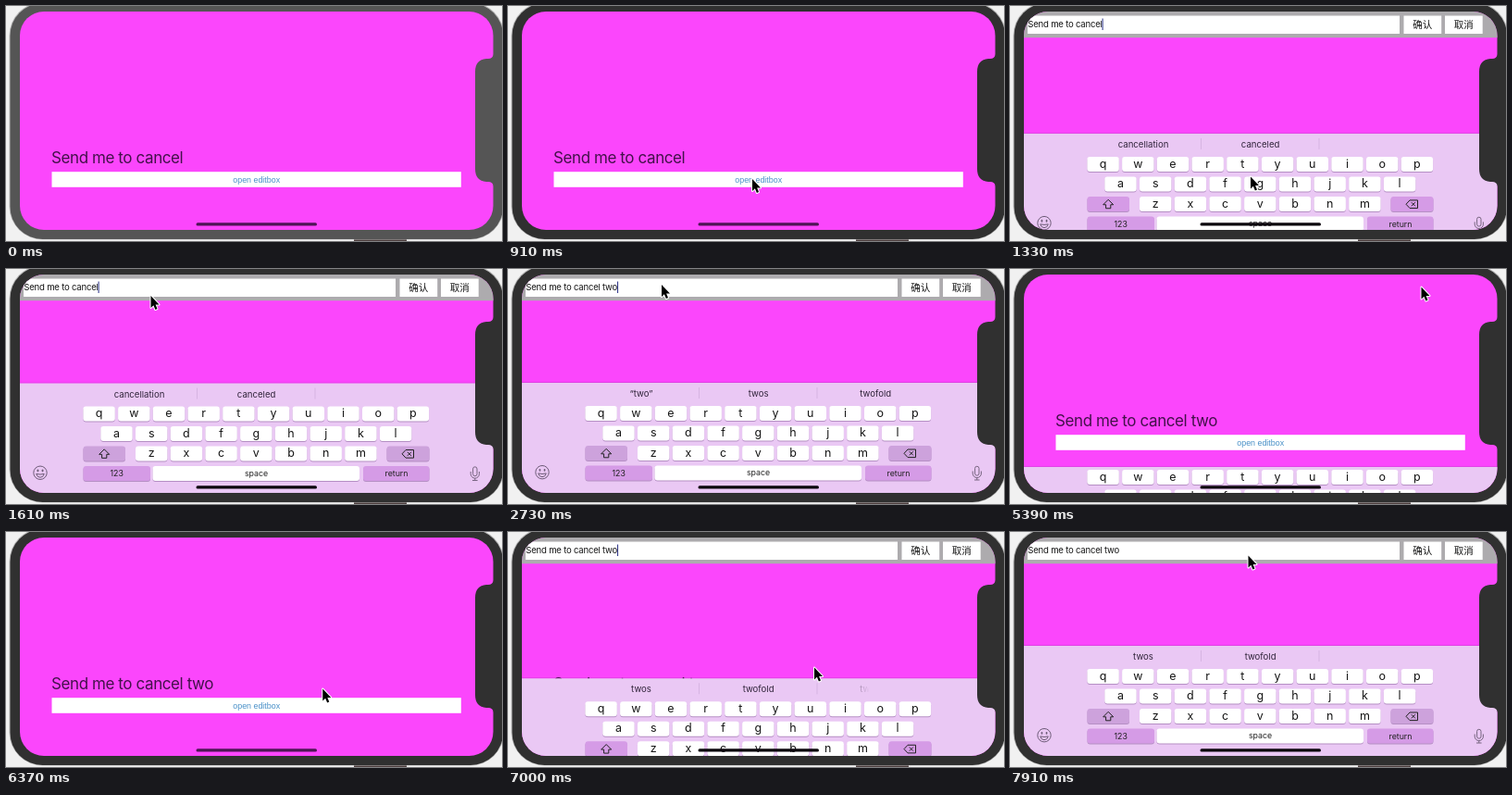
Write an HTML page with a canvas that moves like this. It is 536x254 px and loops after 8 s.

```html
<!DOCTYPE html>
<html lang="en">
<head>
<meta charset="utf-8">
<title>Edit box on a phone</title>
<style>
html, body { margin: 0; width: 100%; height: 100%; overflow: hidden; background: #f1f1f1; }
canvas { display: block; width: 536px; height: 254px; }
</style>
</head>
<body>
<canvas id="stage"></canvas>
<script>
const W = 536, H = 254, LOOP = 8000;
const canvas = document.getElementById('stage');
const dpr = window.devicePixelRatio || 1;
canvas.width = W * dpr;
canvas.height = H * dpr;
const ctx = canvas.getContext('2d');

const UI = 'Inter, "Noto Sans", sans-serif';
const PLAIN = '"Liberation Sans", Arial, sans-serif';
const CJK = '"Noto Sans CJK SC", "Noto Sans CJK", sans-serif';
const TIGHT = -0.024;

const FOCUS = 910;
const OPEN = [1065, 6816];
const CLOSE = 5265;
const KEYS = [2310, 2450, 2590, 2730];

// time, x, y of the pointer tip
const POINTER = [
  [140, -12, 232], [840, 264, 187], [1120, 264, 187], [1330, 260, 184.5],
  [1610, 156.5, 29], [1750, 158, 20], [1890, 166, 17], [3920, 166, 17],
  [4620, 436, 12], [4900, 444.5, 19.5], [5530, 444.5, 19.5], [6020, 352, 150],
  [6160, 352, 150], [6560, 334, 186], [6840, 334, 186], [7000, 331, 146.5],
  [7560, 262, 30], [7800, 257.5, 25.5], [8000, 257.5, 25.5]
];

const HINTS = [
  [1065, ['cancellation', 'canceled', '']],
  [2310, ['', '', '']],
  [2450, ['“t”', 'the', 'to']],
  [2590, ['“tw”', 'two', 'twice']],
  [2730, ['“two”', 'twos', 'twofold']],
  [6816, ['twos', 'twofold', '']]
];

const ROWS = [['qwertyuiop', 100.6, 148], ['asdfghjkl', 119.5, 169.5], ['zxcvbnm', 157.2, 191]];
const PITCH = 37.7, KEY_W = 34.4, KEY_H = 16;

const ease = p => p * p * (3 - 2 * p);
const spring = s => s <= 0 ? 0 : 1 - (1 + 14 * s) * Math.exp(-14 * s);

function round(x, y, w, h, r, fill) {
  ctx.beginPath();
  ctx.roundRect(x, y, w, h, r);
  ctx.fillStyle = fill;
  ctx.fill();
}

function rect(x, y, w, h, fill) {
  ctx.fillStyle = fill;
  ctx.fillRect(x, y, w, h);
}

// Returns the width of the drawn text.
function text(str, x, y, size, family, fill, align = 'center', tracking = 0) {
  ctx.font = `${size}px ${family}`;
  ctx.letterSpacing = `${tracking * size}px`;
  ctx.textAlign = align;
  ctx.fillStyle = fill;
  ctx.fillText(str, x, y);
  return ctx.measureText(str).width;
}

function line(path, width = 1, color = '#222') {
  ctx.lineWidth = width;
  ctx.strokeStyle = color;
  ctx.stroke(new Path2D(path));
}

function at(x, y, draw) {
  ctx.save();
  ctx.translate(x, y);
  draw();
  ctx.restore();
}

function key(x, y, w, fill) {
  round(x, y + 1, w, KEY_H, 3, '#b58fc4');
  round(x, y, w, KEY_H, 3, fill);
}

function typed(t) {
  const count = KEYS.filter(k => t >= k).length;
  return 'Send me to cancel' + ' two'.slice(0, count);
}

function scene(t) {
  rect(15, 6, 512, 237, '#fb46fc');
  const label = t < CLOSE ? 'Send me to cancel' : 'Send me to cancel two';
  text(label, 49, 169.5, 17, UI, '#43124a', 'left', TIGHT);
  rect(49.5, 179.2, 442.3, 16.6, '#fff');
}

function editBar(t) {
  rect(15, 6, 512, 28.2, '#adabae');
  rect(19, 10.5, 402, 19.5, '#fff');
  for (const [x, name] of [[425.5, '确认'], [470, '取消']]) {
    rect(x, 10.5, 40.7, 19.5, '#fff');
    text(name, x + 20.2, 24.2, 10.5, CJK, '#161616');
  }
  const shown = text(typed(t), 19.3, 23.4, 9.6, UI, '#161616', 'left', TIGHT);
  const reset = [...OPEN, 1890, ...KEYS].filter(k => k <= t);
  if ((t - Math.max(...reset)) % 1100 < 600) rect(19.3 + shown, 13.5, 1, 12.5, '#252c84');
}

function hints(t, y) {
  let i = 0;
  while (i < HINTS.length - 1 && t >= HINTS[i + 1][0]) i++;
  const [start, words] = HINTS[i];
  const before = i ? HINTS[i - 1][1] : ['', '', ''];
  const p = (t - start) / 240;
  words.forEach((word, n) => {
    const x = 144 + n * 126.6;
    if (word) {
      text(word, x, y + 15, 9.6, UI, '#30243a');
    } else if (before[n] && p < 1) {
      const edge = x + 20 - 60 * p;
      const fade = ctx.createLinearGradient(edge, 0, edge + 20, 0);
      fade.addColorStop(0, 'rgba(48,36,58,.6)');
      fade.addColorStop(1, 'rgba(48,36,58,0)');
      text(before[n], x, y + 15, 9.6, UI, fade);
    }
  });
  rect(206, y + 5, 1, 12, 'rgba(150,110,165,.22)');
  rect(333.5, y + 5, 1, 12, 'rgba(150,110,165,.22)');
}

function keyboard(t, shift, bar) {
  const top = bar ? 123 : 145;
  const side = shift > 5 ? '#d59be6' : '#cda2dc';
  const low = '#d59be6';
  ctx.save();
  ctx.translate(0, shift);
  rect(15, top - 1, 512, 1, 'rgba(120,30,130,.2)');
  rect(15, top, 512, 140, '#eac8f4');
  if (bar) hints(t, top);

  for (const [letters, x, y] of ROWS) {
    [...letters].forEach((c, i) => {
      const cx = x + i * PITCH;
      key(cx - KEY_W / 2, y, KEY_W, '#fff');
      text(c, cx, y + 11.7, 12.5, UI, '#161616');
    });
  }
  key(83.5, 191, 45.5, side);
  key(411.5, 191, 46, side);
  key(83.5, 212.5, 72.5, low);
  key(158.5, 212.5, 223.5, '#fff');
  key(386, 212.5, 71.5, low);
  text('123', 119.7, 223.8, 8.8, UI, '#222');
  text('space', 270.5, 223.4, 8.8, UI, '#222');
  text('return', 422, 223.6, 8.8, UI, '#222');

  at(106.2, 199.3, () => line('M0 -5L5.5 .5H2.6V4.5H-2.6V.5H-5.5Z'));
  at(434.5, 199.3, () => line('M-6.5 0L-2.5 -4.3H6V4.3H-2.5ZM-.7 -2L3.3 2M3.3 -2L-.7 2'));
  at(37, 219.7, () => {
    line('M7.2 0A7.2 7.2 0 1 1 -7.2 0A7.2 7.2 0 1 1 7.2 0M-4.3 1.2Q0 2.4 4.3 1.2Q3.4 5 0 5Q-3.4 5 -4.3 1.2', 1, '#6c5a76');
    round(-3.4, -3.8, 1.7, 2.8, 1, '#6c5a76');
    round(1.7, -3.8, 1.7, 2.8, 1, '#6c5a76');
  });
  at(506.8, 220, () => {
    line('M-2.2 -4.5A2.2 2.2 0 0 1 2.2 -4.5V1A2.2 2.2 0 0 1 -2.2 1ZM-4.6 -1.5V1A4.6 4.6 0 0 0 4.6 1V-1.5M0 5.5V8M-2.8 8H2.8', 1, '#76647f');
  });
  ctx.restore();
}

function pointer(t) {
  if (t < POINTER[0][0]) return;
  const i = Math.max(1, POINTER.findIndex(p => p[0] > t));
  const [t0, x0, y0] = POINTER[i - 1], [t1, x1, y1] = POINTER[i];
  const p = ease((t - t0) / (t1 - t0));
  at(x0 + (x1 - x0) * p, y0 + (y1 - y0) * p, () => {
    const arrow = new Path2D('M0 0V13L2.9 10.3L4.9 15L7 14.1L5.1 9.5H9Z');
    ctx.lineJoin = 'round';
    ctx.lineWidth = 2;
    ctx.strokeStyle = '#fff';
    ctx.stroke(arrow);
    ctx.fillStyle = '#000';
    ctx.fill(arrow);
  });
}

function draw(t) {
  ctx.setTransform(dpr, 0, 0, dpr, 0, 0);
  const bezel = t < FOCUS ? '#555' : '#303030';
  rect(0, 0, W, H, '#f1f1f1');
  rect(376, 251, 57, 3, '#4b3d3d');
  round(3.5, -4, 534.5, 256.5, 36, '#b4b4b4');
  round(4.5, -3, 532.5, 255, 35, bezel);

  const opened = OPEN.filter(k => t >= k).pop();
  const closing = t >= CLOSE && t < OPEN[1];
  const editing = opened !== undefined && !closing;
  const shift = editing ? 131 * (1 - spring((t - opened) / 1000))
    : closing ? 131 * spring((t - CLOSE) / 1000) : 131;

  ctx.save();
  ctx.beginPath();
  ctx.roundRect(15, 6, 511.5, 236, 26);
  ctx.clip();
  scene(t);
  text('open editbox', 270.7, 190.5, 8.9, PLAIN, '#4a90c8');
  if (editing) editBar(t);
  if (shift < 108) keyboard(t, shift, editing);
  round(205.5, 234.3, 130.5, 3.2, 1.6, shift < 108 ? '#0b060c' : '#4d1555');
  ctx.restore();

  ctx.fillStyle = bezel;
  ctx.fill(new Path2D('M527 52Q526 57 521 57H519Q507 58 507 71V176Q507 189 519 190H521Q526 190 527 195Z'));
  pointer(t);
}

function tick(now) {
  draw(now % LOOP);
  requestAnimationFrame(tick);
}
draw(0);
requestAnimationFrame(tick);
</script>
</body>
</html>
```
